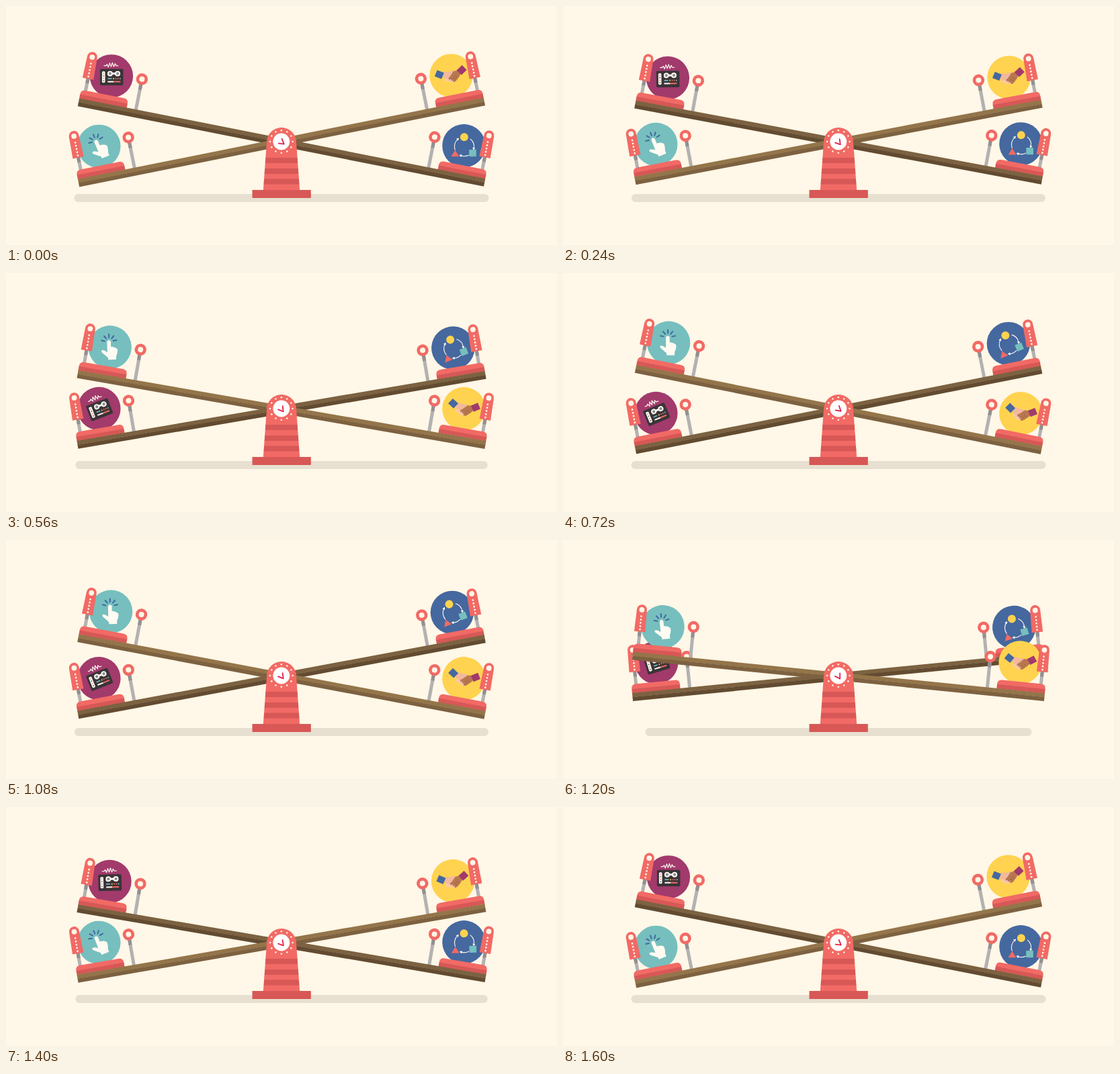
These frames come from a looping animation (820x356 px, 1640 ms). An HTML page:

```html
<!DOCTYPE html>
<html lang="en">
<head>
<meta charset="utf-8">
<title>Seesaw</title>
<style>
  html, body { margin: 0; width: 100%; height: 100%; overflow: hidden; background: #fff7e7; }
  svg { display: block; width: 820px; height: 356px; }
</style>
</head>
<body>
<svg id="stage" viewBox="0 0 820 356"></svg>
<script>
const RED = '#f26a65', DARK_RED = '#d75856', WHITE = '#fffaf2', CREAM = '#fff7e7';
const BLUE = '#45689f', TEAL = '#76bfbe', YELLOW = '#ffd34f', PURPLE = '#a23a6c';
const HALF = 308;

const rect = (x, y, w, h, fill, rx = 0) =>
  `<rect x="${x}" y="${y}" width="${w}" height="${h}" rx="${rx}" fill="${fill}"/>`;
const dot = (x, y, r, fill) => `<circle cx="${x}" cy="${y}" r="${r}" fill="${fill}"/>`;
const path = (d, fill) => `<path d="${d}" fill="${fill}"/>`;
const line = (d, color, w) =>
  `<path d="${d}" fill="none" stroke="${color}" stroke-width="${w}" stroke-linecap="round" stroke-linejoin="round"/>`;
const group = (transform, body) => `<g transform="${transform}">${body}</g>`;
const range = (n, f) => Array.from({ length: n }, (_, i) => f(i)).join('');
const polar = (r, deg, cx = 0, cy = 0) => {
  const a = deg * Math.PI / 180;
  return [cx + r * Math.cos(a), cy + r * Math.sin(a)].map(v => v.toFixed(2));
};

// Icons, centred on their ball
function cassette() {
  const reel = x => dot(x, -3.7, 4, WHITE) + dot(x, -3.7, 2.1, '#8b8b90');
  return line('M-11-15.5h3l1.5-2 2 4 2-6 2 5.5 2-6 2 6 2-4.5 1.5 3h3', WHITE, 1.2) +
    rect(-17, -10.5, 34.5, 24.5, '#3a3437', 2) +
    rect(-14, -7, 4.6, 17, WHITE, 1.5) +
    range(4, i => dot(-11.7, -4 + i * 3.7, 0.8, i % 2 ? '#3a3437' : RED)) +
    rect(-2, -5.2, 11, 3, WHITE) + reel(-2) + reel(9.2) +
    rect(-5.5, 3, 6, 1.6, TEAL) +
    dot(3.2, 3.8, 1, YELLOW) + dot(6.6, 3.8, 1, RED) + dot(9.8, 3.8, 1, RED) + dot(13, 3.8, 1, TEAL) +
    rect(-5.5, 7.4, 9, 2, WHITE) + rect(3.5, 7.4, 10, 2, RED);
}

function shapes() {
  const arc = (from, to) => {
    const a = polar(14.5, from, 0.5, 1), b = polar(14.5, to, 0.5, 1);
    const tip = group(`translate(${b}) rotate(${to + 90})`, path('M2.2 0L-1.6-2.1V2.1Z', WHITE));
    return line(`M${a}A14.5 14.5 0 0 1 ${b}`, WHITE, 1.1) + tip;
  };
  return arc(-50, 14) + arc(64, 112) + arc(160, 230) +
    dot(0.5, -13, 6, YELLOW) +
    path('M-13 6.5L-7 16H-19Z', RED) +
    rect(7.8, 5.8, 10.6, 10.2, TEAL);
}

function tap() {
  const rays = range(5, i => {
    const a = -168 + i * 39;
    return line(`M${polar(6.5, a, 0, -8)}L${polar(11.3, a, 0, -8)}`, BLUE, 2);
  });
  const hand = path('M-3-7.5a2.8 2.8 0 0 1 5.6 0V-.5Q5-1.5 6.5.3Q9-.6 9.6 1.6Q12.5 1.8 12.4 5.5Q12 10 10 14' +
    'V18.5H-2V15.5L-11-7.5L-11 7.5Q-13 4.5-10 4Q-6.5 4.5-3 7.5Z'.replace('L-11-7.5', ''), WHITE);
  return group('translate(-1 0)', rays + hand);
}

function handshake() {
  return path('M-13-1L-9-8Q-3-5 3-7L6-5L3 5L-4 8L-9 4Z', '#f2b99c') +
    path('M-3 1Q1-6 5-6Q9-5 12-8L15-1Q12 4 7 8Q3 12 0 9L-6 5L-4 2Z', '#b87750') +
    path('M-12-2L-9-8Q-3-5 3-7L5-6L-2 1Q-5 3-6 1Z', '#f2b99c') +
    range(4, i => line(`M${-8.5 + i * 3} ${3.5 + i * 1.4}l-1.6 1.8`, '#f7cbb2', 2.6)) +
    range(3, i => line(`M${2 + i * 3} ${8.5 - i * 2.4}l-3-2.4`, '#98603f', 0.8)) +
    group('translate(-17 -5) rotate(33)', rect(-5.5, -5, 11, 10, BLUE)) +
    group('translate(17 -5) rotate(-33)', rect(-5.5, -5, 11, 10, PURPLE));
}

// One seat at the left end of a beam; the right end is mirrored
function seat() {
  const post = (x, top, dark, bottom) =>
    rect(x - 2.5, top, 5, bottom - top, '#b3b1b1') + rect(x - 2.5, top, 5, dark, '#929092');
  return post(-222, -45, 9, -5) + dot(-222, -52, 8.7, RED) + dot(-222, -52, 4, CREAM) +
    post(-301, -38, 8, -16) +
    path('M-308.5-70a7.5 7.5 0 0 1 15 0L-292.7-37H-309.3Z', RED) +
    dot(-301, -69.7, 3.9, CREAM) +
    range(5, i => dot(-301, -60 + i * 4.9, 1.4, CREAM)) +
    path('M-308-11.5V-12Q-308-19-301-19H-243Q-236-19-236-12V-11.5Z', RED) +
    rect(-308, -12, 72, 6.5, DARK_RED);
}

function beam(id, top, bottom, balls) {
  const ball = ([x, color, icon, tilt]) => group(`translate(${x} -47.7)`,
    dot(0, 0, 32.2, color) + group(`rotate(${tilt})`, icon()));
  return `<g id="${id}">` + balls.map(ball).join('') + seat() + group('scale(-1 1)', seat()) +
    rect(-HALF, -6, HALF * 2, 6.3, top) + rect(-HALF, 0, HALF * 2, 6, bottom) + '</g>';
}

function tower() {
  const stripe = y => {
    const w = 22 + (y - 203) * 0.07, v = w + 0.55;
    return path(`M${410 - w} ${y}H${410 + w}L${410 + v} ${y + 8}H${410 - v}Z`, DARK_RED);
  };
  return path('M388 203a22 22 0 0 1 44 0L437.2 275H382.8Z', RED) +
    [226, 242, 257.5].map(stripe).join('') +
    rect(366.5, 274, 87.3, 12, DARK_RED) +
    range(12, i => dot(...polar(16.8, i * 30, 409.8, 202), 1.3, CREAM)) +
    dot(409.8, 202, 12.4, '#fff') +
    `<g id="hands">${line('M-4.8 1.8L3 4.2L1.4-4', '#e3214f', 1.8)}</g>`;
}

const BACK = 11.2, FRONT = 11.35;
const stage = document.getElementById('stage');
stage.innerHTML =
  '<rect id="ground" y="280" height="12" rx="6" fill="#e7e0d0"/>' +
  beam('back', '#7c6241', '#624b31', [[-267.5, PURPLE, cassette, -BACK], [267.2, BLUE, shapes, -BACK]]) +
  beam('front', '#94754a', '#7d6140', [[-267.5, TEAL, tap, -FRONT], [267.2, YELLOW, handshake, 0]]) +
  tower();
const [ground, back, front, hands] = ['ground', 'back', 'front', 'hands'].map(id => document.getElementById(id));

// Timing
const LOOP = 1640, SWING = 840, START = 160, MOVE = 520;

// cubic-bezier(.6, 0, .4, 1)
function ease(u) {
  if (u <= 0) return 0;
  if (u >= 1) return 1;
  let lo = 0, hi = 1, s = 0.5;
  for (let i = 0; i < 24; i++) {
    s = (lo + hi) / 2;
    const x = 1.8 * s * (1 - s) ** 2 + 1.2 * s * s * (1 - s) + s ** 3;
    if (x < u) lo = s; else hi = s;
  }
  return s * s * (3 - 2 * s);
}

// Swing position from 1 (back beam left end up) to -1 and back
function swing(t) {
  const second = t >= SWING;
  const v = 1 - 2 * ease(((second ? t - SWING : t) - START) / MOVE);
  return second ? -v : v;
}

// Each beam turns about a point slightly off its middle
const turn = (el, x, y, offset, angle) =>
  el.setAttribute('transform', `translate(${x} ${y}) rotate(${angle}) translate(${offset} 0)`);

function draw(t) {
  const v = swing(t), half = 308.5 - 34.5 * (1 - swing(t + 5) ** 2) ** 2;
  ground.setAttribute('x', 410 - half);
  ground.setAttribute('width', half * 2);
  turn(back, 412, 203.5, -2, BACK * v);
  turn(front, 409, 203.2, 1, -FRONT * v);
  turn(hands, 410, 202, 0, -11 * Math.cos(4 * Math.PI * t / LOOP));
}

const begin = performance.now();
function tick() {
  draw((performance.now() - begin) % LOOP);
  requestAnimationFrame(tick);
}
draw(0);
requestAnimationFrame(tick);
</script>
</body>
</html>
```
